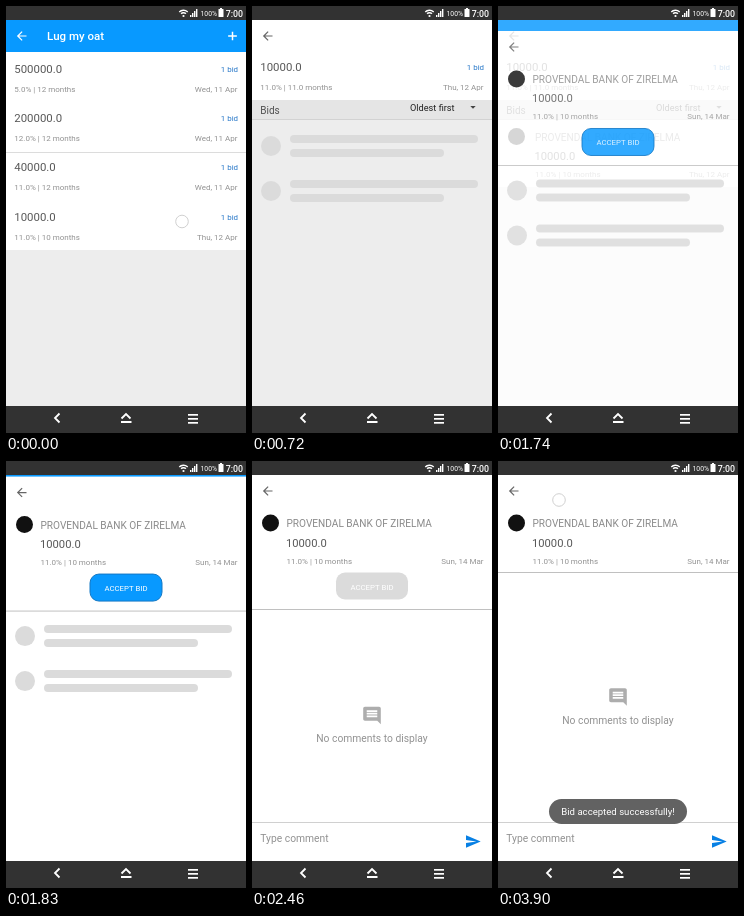
An HTML page with a canvas for the animation above (3.93 s loop, 240x427 px).

```html
<!DOCTYPE html>
<html lang="en">
<head>
<meta charset="utf-8">
<title>Loan bids</title>
<style>
html, body { margin: 0; width: 100%; height: 100%; overflow: hidden; background: #eee; }
canvas { display: block; width: 240px; height: 427px; }
</style>
</head>
<body>
<canvas id="stage"></canvas>
<script>
const W = 240, H = 427, LOOP = 3930;
const STATUS = 14, NAV = 400;
const BLUE = '#0899ff', DARK = '#323232', PALE = '#ededed';
const INK = '#585858', SOFT = '#929292', LINK = '#2878c8';
const BANK = 'PROVENDAL BANK OF ZIRELMA';

// Moments, in ms
const OPEN_LOAN = 240, BIDS_LOADED = 1110, OPEN_BID = 1670, COMMENTS_LOADED = 2010;
const ACCEPT = 2340, ACCEPTED = 2490;

const TOUCHES = [
  { x: 176, y: 215.5, from: -200, to: 230 },
  { x: 72, y: 150, from: 1200, to: 1500 },
  { x: 120, y: 125, from: 2190, to: 2370 },
  { x: 28, y: 43.5, from: 2730, to: 3150 },
  { x: 61, y: 39, from: 3570, to: 4100 }
];

const ICON = {
  back: new Path2D('M20 11H7.83l5.59-5.59L12 4l-8 8 8 8 1.41-1.41L7.83 13H20v-2z'),
  add: new Path2D('M19 13.2h-5.8V19h-2.4v-5.8H5v-2.4h5.8V5h2.4v5.8H19z'),
  comment: new Path2D('M22 4c0-1.1-.9-2-2-2H4c-1.1 0-2 .9-2 2v12c0 1.1.9 2 2 2h14l4 4zM18 14H6v-2h12v2zm0-3H6V9h12v2zm0-3H6V6h12v2z'),
  send: new Path2D('M2 21L23 12 2 3v7l15 2-15 2z')
};

const canvas = document.getElementById('stage');
const ctx = canvas.getContext('2d');
const ratio = window.devicePixelRatio || 1;
canvas.width = W * ratio;
canvas.height = H * ratio;

const clamp = v => Math.max(0, Math.min(1, v));

function text(str, x, y, size, color, align = 'left', weight = 400) {
  ctx.font = `${weight} ${size}px Roboto, sans-serif`;
  ctx.textAlign = align;
  ctx.fillStyle = color;
  ctx.fillText(str, x, y);
}

function rect(x, y, w, h, color) {
  ctx.fillStyle = color;
  ctx.fillRect(x, y, w, h);
}

function pill(x, y, w, h, r, color) {
  ctx.beginPath();
  ctx.roundRect(x, y, w, h, r);
  ctx.fillStyle = color;
  ctx.fill();
}

function disc(x, y, r, color) {
  ctx.beginPath();
  ctx.arc(x, y, r, 0, Math.PI * 2);
  ctx.fillStyle = color;
  ctx.fill();
}

function stroke(color, width) {
  ctx.strokeStyle = color;
  ctx.lineWidth = width;
  ctx.stroke();
}

function polyline(points, color, width) {
  ctx.beginPath();
  points.forEach(([x, y]) => ctx.lineTo(x, y));
  stroke(color, width);
}

function icon(name, x, y, scale, color) {
  ctx.save();
  ctx.translate(x, y);
  ctx.scale(scale, scale);
  ctx.translate(-12, -12);
  ctx.fillStyle = color;
  ctx.fill(ICON[name]);
  ctx.restore();
}

function loanRow(y, amount, terms, date) {
  text(amount, 8.3, y, 11.4, INK);
  text('1 bid', 232, y - 1, 7.9, LINK, 'right');
  text(terms, 8.3, y + 19, 8, SOFT);
  text(date, 231.5, y + 19, 8, SOFT, 'right');
}

function skeleton(y) {
  for (const top of [y, y + 45]) {
    disc(19, top + 11, 10, '#dbdbdb');
    pill(38, top, 188, 8, 4, '#dbdbdb');
    pill(38, top + 14, 154, 8, 4, '#dbdbdb');
  }
}

function bidCard(x, y, gap, date) {
  disc(18.5, y - 4, 8.5, '#111');
  text(BANK, x, y, 10.1, '#8a8a8a');
  text('10000.0', x - 0.5, y + gap, 11.2, INK);
  text('11.0% | 10 months', x, y + gap + 17, 8, SOFT);
  text(date, 231.5, y + gap + 17, 8, SOFT, 'right');
}

function loanList() {
  rect(0, 0, W, H, PALE);
  rect(0, STATUS, W, 32, BLUE);
  icon('back', 15.7, 30, 0.6, '#fff');
  text('Lug my oat', 41, 34, 11.5, '#fff', 'left', 500);
  icon('add', 226.5, 30, 0.62, '#fff');
  rect(0, 46, W, 198, '#fff');
  rect(0, 146, W, 1, '#dcdcdc');
  loanRow(67, '500000.0', '5.0% | 12 months', 'Wed, 11 Apr');
  loanRow(116, '200000.0', '12.0% | 12 months', 'Wed, 11 Apr');
  loanRow(165, '40000.0', '11.0% | 12 months', 'Wed, 11 Apr');
  loanRow(214.5, '10000.0', '11.0% | 10 months', 'Thu, 12 Apr');
}

function loanDetail(t) {
  rect(0, 0, W, H, PALE);
  rect(0, STATUS, W, 94 - STATUS, '#fff');
  icon('back', 15.7, 30, 0.6, '#666');
  loanRow(65, '10000.0', '11.0% | 11.0 months', 'Thu, 12 Apr');
  rect(0, 94, W, 19, '#e5e5e5');
  rect(0, 113, W, 1, '#d2d2d2');
  text('Bids', 8.3, 108, 10, '#505050');
  text('Oldest first', 158, 104.5, 9.2, '#222');
  ctx.beginPath();
  ctx.moveTo(218.3, 100);
  ctx.lineTo(223.7, 100);
  ctx.lineTo(221, 102.8);
  ctx.fillStyle = '#444';
  ctx.fill();
  if (t < BIDS_LOADED) {
    skeleton(129);
  } else {
    rect(0, 114, W, 67, '#fff');
    bidCard(37, 134.5, 19.5, 'Thu, 12 Apr');
  }
}

function acceptButton(t) {
  const live = t < ACCEPT;
  pill(84, 111.5, 72, 27, 9, live ? BLUE : '#dbdbdb');
  if (live) stroke('#1478c4', 1);
  text('ACCEPT BID', 120, 128.5, 7.8, '#fff', 'center');
}

function toast(t) {
  ctx.save();
  ctx.globalAlpha = clamp((t - ACCEPTED + 30) / 90);
  pill(51, 338, 138, 25, 12.5, '#626262');
  text('Bid accepted successfully!', 120, 354, 9.6, '#fff', 'center');
  ctx.restore();
}

function bidDetail(t) {
  const done = t >= ACCEPTED;
  const divider = done ? 111 : 148;
  rect(0, 0, W, H, '#fff');
  icon('back', 15.7, 30, 0.6, '#666');
  bidCard(34.5, 66, 19.5, 'Sun, 14 Mar');
  if (!done) acceptButton(t);
  rect(0, divider, W, 1, '#c0c0c0');
  if (t < COMMENTS_LOADED) {
    skeleton(162.5);
    return;
  }
  const middle = (divider + 361) / 2;
  icon('comment', 120, middle, 0.88, '#adadad');
  text('No comments to display', 120, middle + 26.5, 10.3, SOFT, 'center');
  rect(0, 361, W, 1, '#d0d0d0');
  text('Type comment', 8.3, 381, 10.3, SOFT);
  icon('send', 221, 380.5, 0.7, '#0880e4');
  if (done) toast(t);
}

// New pages rise by 8% of the height while fading in.
function openPage(t, start, draw) {
  if (t < start) return;
  const age = t - start;
  ctx.save();
  ctx.globalAlpha = 1 - (1 - clamp(age / 200)) ** 4;
  ctx.translate(0, H * 0.08 * (1 - clamp(age / 350)) ** 5);
  draw(t);
  rect(0, 0, W, STATUS, BLUE);
  ctx.restore();
}

function statusBar() {
  rect(0, 0, W, STATUS, DARK);
  disc(177.5, 10, 1.1, '#fff');
  for (const r of [3.3, 5.8]) {
    ctx.beginPath();
    ctx.arc(177.5, 10, r, Math.PI * 1.24, Math.PI * 1.76);
    stroke('#fff', 1.4);
  }
  for (let i = 0; i < 4; i++) rect(184 + i * 2, 9 - i * 2, 1.4, 2 + i * 2, '#fff');
  text('100%', 194.5, 10, 6.8, '#fff');
  pill(212.5, 3, 5, 8, 0.6, '#fff');
  rect(214, 2, 2, 1, '#fff');
  text('7:00', 237, 10.5, 8.8, '#fff', 'right', 500);
}

function navBar() {
  rect(0, NAV, W, H - NAV, DARK);
  polyline([[53.5, 407.5], [49, 412], [53.5, 416.5]], '#fff', 1.8);
  polyline([[115.5, 412.5], [120, 408], [124.5, 412.5]], '#fff', 1.8);
  rect(115, 415, 10.5, 2, '#fff');
  for (const y of [408, 412, 416]) rect(182, y, 10, 1.7, '#fff');
}

function touch({ x, y, from, to }, t) {
  const alpha = clamp(Math.min(t - from, to - t) / 120);
  if (!alpha) return;
  ctx.save();
  ctx.globalAlpha = alpha;
  disc(x, y, 6.3, 'rgba(255,255,255,0.6)');
  stroke('#cbcbcb', 0.9);
  ctx.restore();
}

function render(t) {
  ctx.setTransform(ratio, 0, 0, ratio, 0, 0);
  loanList();
  openPage(t, OPEN_LOAN, loanDetail);
  openPage(t, OPEN_BID, bidDetail);
  statusBar();
  navBar();
  TOUCHES.forEach(item => touch(item, t));
}

const begin = performance.now();
function tick() {
  render((performance.now() - begin) % LOOP);
  requestAnimationFrame(tick);
}
tick();
</script>
</body>
</html>
```
